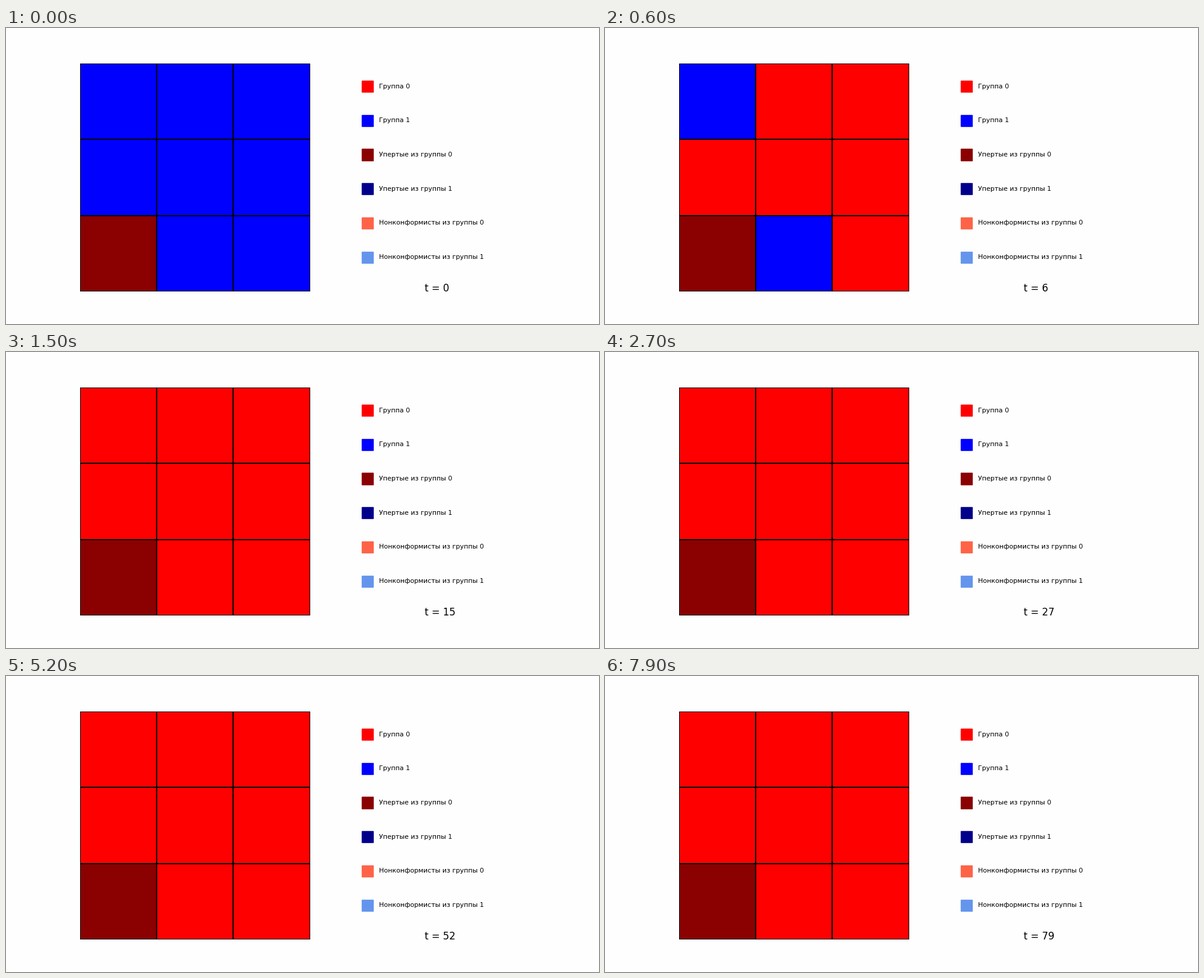
These frames come from a looping animation (1000x500 px, 8000 ms). A matplotlib script:

```python
import matplotlib.pyplot as plt
from matplotlib.animation import FuncAnimation
from matplotlib.patches import Rectangle

STEPS, STEP_MS = 80, 100
N = 3

# Cells of group 1 at each step, numbered row by row from the top left;
# after the last entry the whole grid belongs to group 0.
BLUE = ["01234578", "0124578", "12458", "245", "45",
        "05", "07", "78", "8", "8"]
STUBBORN = 6

LEGEND = [
    ("red", "Группа 0"),
    ("blue", "Группа 1"),
    ("darkred", "Упертые из группы 0"),
    ("darkblue", "Упертые из группы 1"),
    ("tomato", "Нонконформисты из группы 0"),
    ("cornflowerblue", "Нонконформисты из группы 1"),
]

plt.rcParams["font.family"] = "DejaVu Sans"
fig, (grid, info) = plt.subplots(1, 2, figsize=(10, 5), dpi=100,
                                 gridspec_kw={"wspace": 0})
fig.patch.set_facecolor("#fefefe")

grid.set(xlim=(0, N), ylim=(N, 0))
info.set(xlim=(0, 1), ylim=(0, 1))
for ax in (grid, info):
    ax.axis("off")

cells = [grid.add_patch(Rectangle((i % N, i // N), 1, 1, lw=0))
         for i in range(N * N)]
for k in range(N + 1):
    grid.axhline(k, color="black", lw=1.5)
    grid.axvline(k, color="black", lw=1.5)

for k, (color, label) in enumerate(LEGEND):
    y = 0.9 - 0.15 * k
    info.add_patch(Rectangle((0.225, y - 0.025), 0.05, 0.05, color=color))
    info.text(0.3, y, label, fontsize=8, va="center")

clock = info.text(0.5, 0, "", fontsize=12)


def update(t):
    blue = BLUE[t] if t < len(BLUE) else ""
    for i, cell in enumerate(cells):
        if i == STUBBORN:
            cell.set_facecolor("darkred")
        else:
            cell.set_facecolor("blue" if str(i) in blue else "red")
    clock.set_text(f"t = {t}")
    return cells + [clock]


anim = FuncAnimation(fig, update, frames=STEPS, interval=STEP_MS,
                     repeat=True, repeat_delay=0)
plt.show()
```
